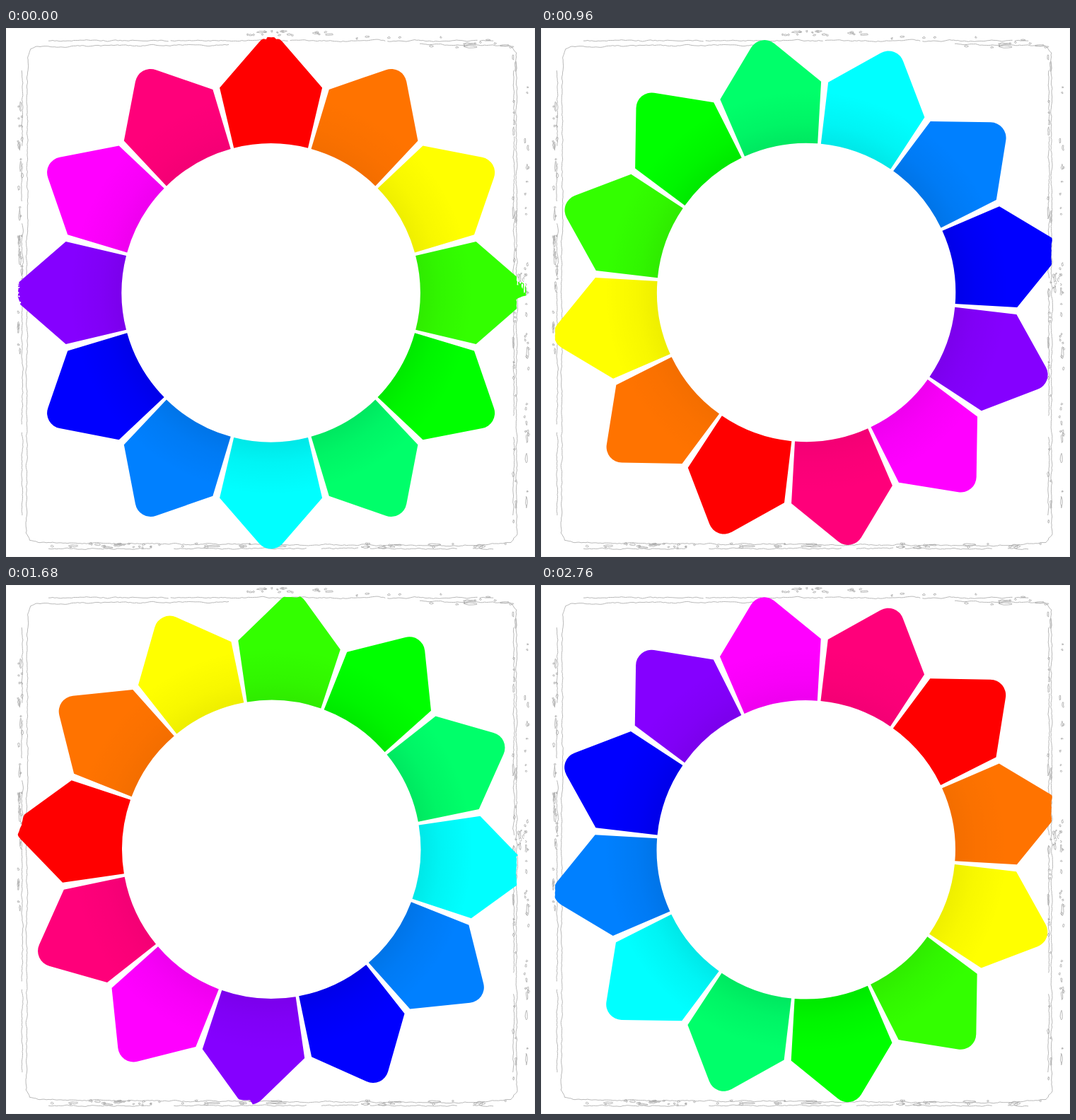
These frames come from a looping animation (748 px wide and 748 px high, 2880 ms). An HTML page:

```html
<!DOCTYPE html>
<html lang="en">
<head>
<meta charset="utf-8">
<title>Turning colour wheel</title>
<style>
  html, body { margin: 0; width: 100%; height: 100%; overflow: hidden; background: #fff; }
  svg { display: block; width: 100vw; height: 100vh; }
</style>
</head>
<body>
<svg viewBox="0 0 748 748">
  <defs>
    <radialGradient id="shade" gradientUnits="userSpaceOnUse" cx="0" cy="0" r="300">
      <stop offset=".7"/>
      <stop offset=".8" stop-opacity=".45"/>
      <stop offset=".95" stop-opacity="0"/>
    </radialGradient>
    <clipPath id="worn"><path id="edge"/></clipPath>
  </defs>
  <rect width="748" height="748" fill="#fff"/>
  <rect x=".5" y=".5" width="747" height="747" fill="none" stroke="#f7f7f7"/>
  <path id="border" fill="none" stroke="#a6a6a6" stroke-width=".8"/>
  <g clip-path="url(#worn)"><g id="wheel"></g></g>
  <path id="specks" fill="#fff"/>
</svg>
<script>
const SIZE = 748;
const $ = id => document.getElementById(id);

let seed = 71;
const rnd = () => (seed = (seed * 16807) % 2147483647) / 2147483647;
const spread = a => (rnd() * 2 - 1) * a;

const toPath = pts => 'M' + pts.map(p => p.map(v => v.toFixed(1)).join(' ')).join('L');

// Wobbly line through a few key points
function rough(keys, amp = 0.8, step = 3) {
  const pts = [];
  let drift = 0;
  for (let i = 1; i < keys.length; i++) {
    const [x0, y0] = keys[i - 1], dx = keys[i][0] - x0, dy = keys[i][1] - y0;
    const len = Math.hypot(dx, dy), n = Math.ceil(len / step);
    for (let k = 0; k < n; k++) {
      drift = drift * 0.7 + spread(amp);
      pts.push([x0 + dx * k / n - dy / len * drift, y0 + dy * k / n + dx / len * drift]);
    }
  }
  return toPath(pts);
}

// Point at distance u along a side (0 top, 1 right, 2 bottom, 3 left), set in from the edge
function onSide(side, u, inset) {
  return [[u, inset], [SIZE - inset, u], [u, SIZE - inset], [inset, u]][side];
}

// Ragged closed outline lying along a side
function flake(side, u, inset, long = 1 + 9 * rnd() ** 3) {
  const pts = [];
  for (let k = 0; k < 10; k++) {
    const a = k / 5 * Math.PI;
    pts.push(onSide(side, u + Math.cos(a) * long + spread(0.6), inset + Math.sin(a) * 1.1 + spread(0.6)));
  }
  return toPath(pts) + 'Z';
}

function flakes(side, from, to, inset, width, n) {
  let d = '';
  while (n--) d += flake(side, from + rnd() * (to - from), inset + spread(width));
  return d;
}

// Main outline, then a worn second line and debris on each side
let border = rough([[585, 23], [712, 25], [722, 35], [722, 715], [714, 728], [640, 732],
  [45, 728], [34, 724], [29, 714], [30, 42], [35, 30], [45, 26], [318, 24]]);
[18, 30, 12, 23].forEach((inset, side) => {
  for (let u = 60; u < 690;) {
    const end = Math.min(u + 50 + rnd() * 150, 692);
    border += rough([onSide(side, u, inset), onSide(side, end, inset)]);
    u = end + (side ? rnd() * 30 : 0);
  }
});
border += flakes(0, 340, 465, 7, 4, 18) + flakes(0, 590, 715, 24, 4, 10) + flakes(0, 480, 690, 14, 3, 6)
  + flakes(1, 65, 690, 12, 3, 36) + flakes(1, 340, 370, 18, 6, 10) + flakes(1, 40, 710, 29, 2, 26)
  + flakes(2, 60, 715, 16, 3, 48) + flakes(3, 105, 480, 20, 3, 36);
$('border').setAttribute('d', border);

// The wheel is cut off where the frame is intact
$('edge').setAttribute('d', rough([[26, 26], [298, 26], [300, 16], [368, 16], [370, 13], [380, 13], [382, 16],
  [722, 16], [722, 357], [735, 362], [735, 378], [722, 384], [722, 738], [350, 738], [345, 728], [20, 728],
  [20, 390], [17, 380], [17, 355], [26, 325], [26, 26]], 0.6));
$('specks').setAttribute('d', flakes(1, 355, 368, 19, 6, 6) + flakes(3, 358, 392, 19, 2, 6));

// One petal: key points of its right half, mirrored
const IN = '52.4 -204.6', SIDE = '72.5 -290', TIP = '16.7 -354.4';
const shape = `M-${IN}L-${SIDE} -${TIP}A22 22 0 0 1 ${TIP}L${SIDE} ${IN}A211.2 211.2 0 0 0 -${IN}Z`;
const colors = ['#f00', '#ff7300', '#ff0', '#3f0', '#0f0', '#00ff6a',
  '#0ff', '#0080ff', '#00f', '#8500ff', '#f0f', '#ff007a'];

const petal = (fill, alpha, i) =>
  `<path d="${shape}" fill="${fill}" fill-opacity="${alpha}" transform="rotate(${i * 30})"/>`;

// Shade near the hub is strongest opposite red
$('wheel').innerHTML = colors.map((color, i) =>
  petal(color, 1, i) + petal('url(#shade)', 0.095 * Math.sqrt(Math.sin(i / 12 * Math.PI)), i)).join('');

const STEP = 120, COUNT = 24, PEAK = 13;

// Swings up to the peak and back, skipping one pose at each turn
function draw(ms) {
  const n = Math.floor(ms / STEP) % COUNT;
  const pose = n <= PEAK ? n : COUNT + 1 - n;
  const x = 374.6 + pose * 0.06, y = 374.4 - pose * 0.055;
  $('wheel').setAttribute('transform', `translate(${x} ${y}) rotate(${pose * 25})`);
}

const start = performance.now();
function tick() {
  draw(performance.now() - start);
  requestAnimationFrame(tick);
}
draw(0);
requestAnimationFrame(tick);
</script>
</body>
</html>
```
